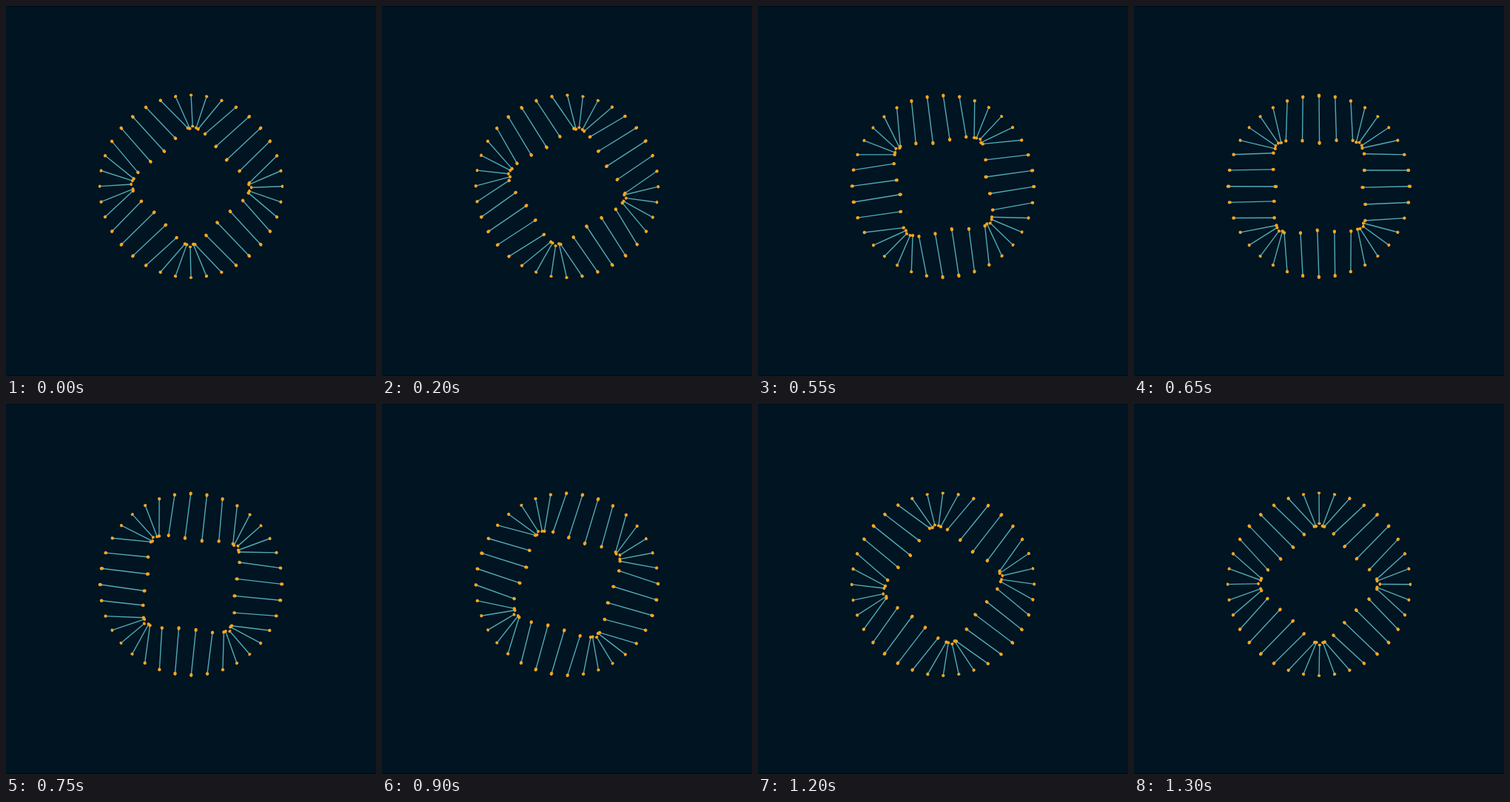
These frames come from a looping animation (500 by 500 pixels, 1350 ms). An HTML page with a canvas:

```html
<!DOCTYPE html>
<html lang="en">
<head>
<meta charset="utf-8">
<title>Ring of swinging pins</title>
<style>
  html, body { margin: 0; width: 100%; height: 100%; overflow: hidden; background: #001422; }
  canvas { display: block; }
</style>
</head>
<body>
<canvas id="stage" width="500" height="500"></canvas>
<script>
const ctx = document.getElementById('stage').getContext('2d');
const LOOP = 1350, STEP = 50, PINS = 36, DELAY = 0.1119;
const CENTER = { x: 250, y: 243.7 }, RADIUS = 125.2;
const DOT = 2.2, LENGTH = 51.2, MIN_STRETCH = 0.8, MAX_STRETCH = 1.25;
const SWING = 25 * Math.PI / 180;

// Triangle wave: 0 at whole numbers, 1 halfway between.
const fold = u => 1 - Math.abs(2 * (u - Math.floor(u)) - 1);

// The cycle starts slowly, then runs at a constant rate.
const phaseAt = step => Math.max(0.95 + 0.77 * step, -0.2 + 1.058 * step) / 27;

function dot(y) {
  ctx.beginPath();
  ctx.arc(0, y, DOT, 0, 2 * Math.PI);
  ctx.fill();
}

// Each pin hangs from the ring, swings about its outer end and stretches along its length.
function drawPin(angle, phase) {
  const stretch = MIN_STRETCH + (MAX_STRETCH - MIN_STRETCH) * fold(phase);
  const swing = SWING * (2 * fold(phase + 0.25) - 1);
  ctx.save();
  ctx.translate(CENTER.x, CENTER.y);
  ctx.rotate(angle);
  ctx.translate(0, -RADIUS);
  ctx.rotate(-swing);
  ctx.scale(1, stretch);
  ctx.beginPath();
  ctx.moveTo(0, DOT);
  ctx.lineTo(0, DOT + LENGTH);
  ctx.stroke();
  dot(DOT);
  dot(DOT + LENGTH);
  ctx.restore();
}

function draw(now) {
  const phase = phaseAt(Math.floor(now % LOOP / STEP));
  ctx.fillStyle = '#001422';
  ctx.fillRect(0, 0, 500, 500);
  ctx.fillStyle = '#000a12';
  ctx.fillRect(0, 0, 500, 1);
  ctx.fillRect(0, 499, 500, 1);

  ctx.strokeStyle = '#51abb4';
  ctx.fillStyle = '#f5a623';
  ctx.lineWidth = 1.4;
  // The first pin is the leftmost; the rest follow clockwise.
  for (let i = 0; i < PINS; i++) {
    drawPin((i / PINS - 0.25) * 2 * Math.PI, phase - i * DELAY);
  }
  requestAnimationFrame(draw);
}
draw(performance.now());
</script>
</body>
</html>
```
